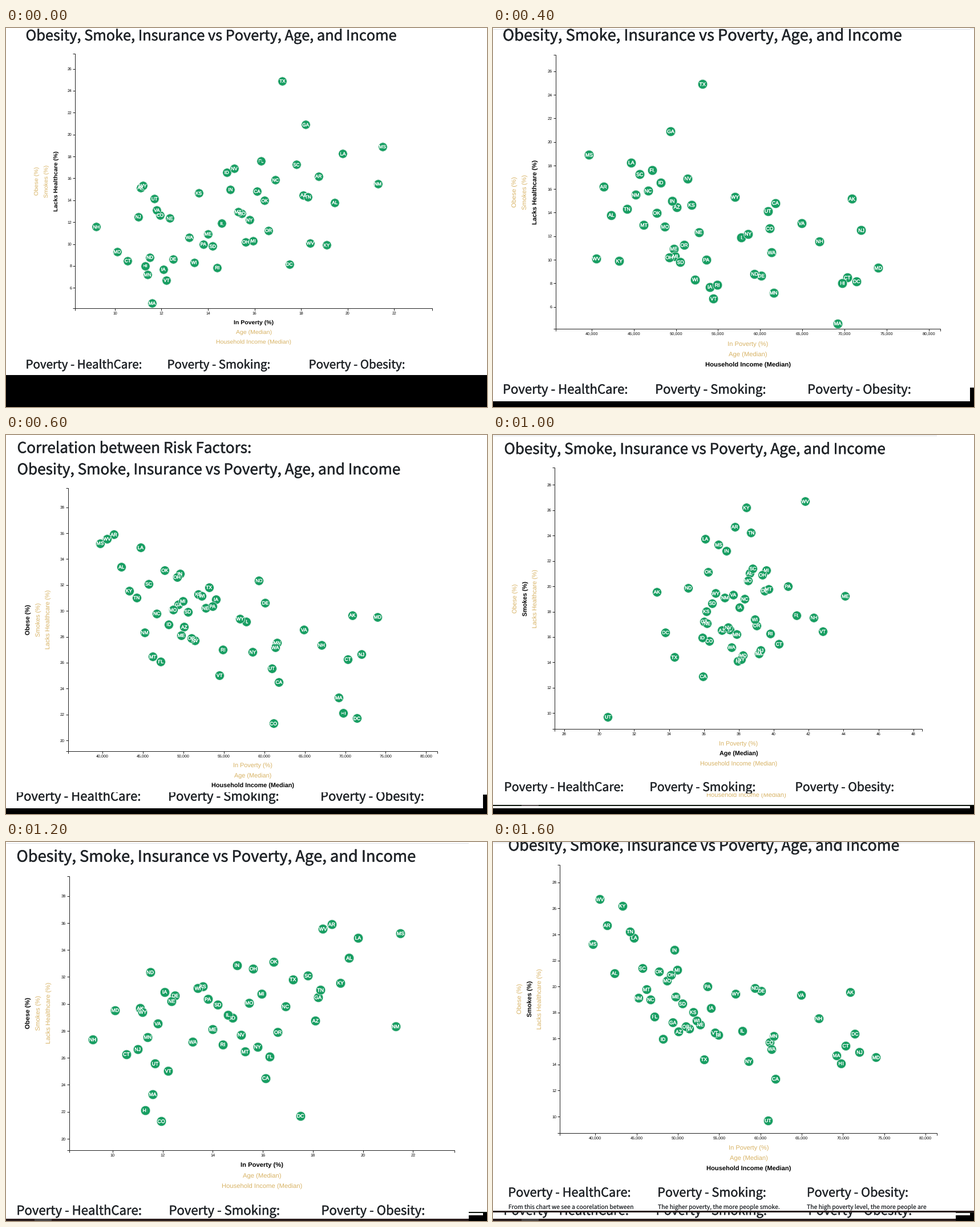
A matplotlib script that plays this animation: 843 px wide and 664 px high, repeating every 1800 ms.

```python
import numpy as np
import matplotlib.pyplot as plt
from matplotlib import patheffects
from matplotlib.animation import FuncAnimation
from matplotlib.patches import Rectangle

W, H, DPI = 843, 664, 100
PT = 72 / DPI  # points per pixel

GREEN, RIM, GOLD, INK = "#179e62", "#dfeee6", "#d8b365", "#212529"
SANS, HUMANIST = "Liberation Sans", "Noto Sans CJK JP"


def ranked(states, *points):
    """Give states, listed from low to high, values along a (rank, value) curve."""
    names = states.split()
    return dict(zip(names, np.interp(range(len(names)), *zip(*points))))


poverty = ranked(
    "NH MD CT NJ AK WY HI MN ND MA UT VA CO IA VT NE DE WA WI KS PA ME SD RI IL ID "
    "IN NV MT MO OH NY MI CA FL OK OR NC TX DC SC AZ GA TN WV AR KY AL LA NM MS",
    (0, 9.2), (1, 10.1), (3, 11), (11, 11.8), (16, 12.5), (17, 13.2), (25, 14.8),
    (36, 16.6), (41, 18.1), (44, 18.4), (48, 19.8), (49, 21.3), (50, 21.5))
age = ranked(
    "UT AK DC TX ND ID CA GA LA KS NE OK CO SD WY MS AZ NM IN NV IL WA VA AR MN HI "
    "IA NY MD NC KY MO AL TN SC WI OR MA NJ OH DE MI MT RI CT PA FL WV NH VT ME",
    (0, 30.5), (1, 33.3), (3, 34.3), (5, 35.9), (12, 36.3), (17, 37.2),
    (34, 38.8), (43, 39.8), (49, 42.8), (50, 44.1))
income = ranked(
    "MS WV AR AL KY TN LA NM SC MT NC FL OK ID MO OH GA IN ME MI AZ SD OR NV KS WI "
    "NE TX PA IA VT RI WY IL NY ND DE UT CO WA MN CA VA NH MA HI CT AK DC NJ MD",
    (0, 39700), (2, 41400), (5, 44200), (15, 49200), (20, 50100), (31, 54900),
    (32, 57000), (37, 60900), (41, 61800), (42, 64900), (44, 69200), (49, 72000),
    (50, 74000))
healthcare = ranked(
    "MA VT MN IA RI HI DC WI CT DE ND MD SD KY PA WV OH MI WA ME OR NH IL NY NE NJ "
    "CO MO MT VA AL OK UT TN AZ KS CA IN AK WY NM NC AR ID NV SC FL LA MS GA TX",
    (0, 4.6), (1, 6.7), (3, 7.7), (10, 8.8), (12, 9.8), (17, 10.3), (23, 12.2),
    (29, 13.1), (30, 13.8), (40, 15.5), (46, 17.6), (48, 18.9), (49, 20.9),
    (50, 24.9))
smokes = ranked(
    "UT CA HI NY TX MD MA NJ WA CT CO ID MN RI DC VT AZ IL NV OR NE GA WI NH FL KS "
    "IA SD NC NM ME VA WY AK DE MT ND PA MO OH AL OK MI SC IN MS LA TN AR KY WV",
    (0, 9.7), (1, 12.9), (2, 14.1), (6, 14.7), (12, 16.2), (17, 16.6), (24, 17.7),
    (28, 19), (37, 20), (39, 20.9), (43, 21.4), (44, 22.8), (48, 24.7),
    (49, 26.2), (50, 26.7))
obesity = ranked(
    "CO DC HI MA CA VT UT FL CT MT NJ NY RI WA NH MN NV OR ME NM VA AZ ID IL WY MD "
    "AK NC SD MO NE PA GA DE MI IA TN WI KS KY TX SC ND OH IN OK AL LA MS WV AR",
    (0, 21.3), (2, 22.1), (4, 24.5), (7, 26.1), (17, 27.9), (24, 29.4),
    (38, 31.3), (46, 33.4), (47, 34.9), (50, 35.9))
STATES = sorted(poverty)

# label, values, tick step
X_VARS = [("In Poverty (%)", poverty, 2), ("Age (Median)", age, 2),
          ("Household Income (Median)", income, 5000)]
Y_VARS = [("Lacks Healthcare (%)", healthcare, 2), ("Smokes (%)", smokes, 2),
          ("Obese (%)", obesity, 2)]
POVERTY, AGE, INCOME = range(3)
HEALTH, SMOKES, OBESE = range(3)

TITLES = ["Obesity, Smoke, Insurance vs Poverty, Age, and Income",
          "Correlation between Risk Factors:"]
COLUMNS = [
    ("Poverty - HealthCare:", "From this chart we see a coorelation between"),
    ("Poverty - Smoking:", "The higher poverty, the more people smoke."),
    ("Poverty - Obesity:", "The high poverty level, the more people are")]

# size, x and y variable, scale, left margin, chart top, rule y, taskbar (y, colour)
PAGES = [
    ((843, 608), POVERTY, HEALTH, 0.929, 36, 45, None, None),
    ((843, 630), AGE, HEALTH, 0.959, 36, 46, 0.5, None),
    ((836, 654), INCOME, HEALTH, 1.0, 18.5, 47, 1.5, None),
    ((843, 626), INCOME, OBESE, 0.96, 21, 93, None, None),
    ((843, 650), POVERTY, SMOKES, 0.986, 21, 95, None, (648, "#0c140c")),
    ((778, 628), AGE, SMOKES, 0.955, 21, 57, 0.5, None),
    ((811, 664), POVERTY, OBESE, 1.0, 20, 59.5, 1.5, (660, "#2a1c1c")),
    ((843, 635), AGE, OBESE, 0.965, 28, 45, 0.5, None),
    ((843, 649), INCOME, SMOKES, 0.98, 28, 39.6, 0.5, (646, "#2a1c1c")),
]

plt.rcParams["text.hinting"] = "none"
fig = plt.figure(figsize=(W / DPI, H / DPI), dpi=DPI, facecolor="black")


def write(ax, x, y, text, px, color="black", family=SANS, ha="center",
          va="baseline", stroke=0, **kw):
    t = ax.text(x, y, text, fontsize=px * PT, color=color, family=family,
                ha=ha, va=va, clip_on=True, **kw)
    if stroke:
        t.set_path_effects([patheffects.Stroke(linewidth=stroke * PT,
                                               foreground=color),
                            patheffects.Normal()])


def line(ax, xs, ys, color="#222222"):
    ax.plot(xs, ys, color=color, lw=PT, solid_capstyle="butt",
            solid_joinstyle="miter")


def domain(data):
    return min(data.values()) * 0.9, max(data.values()) * 1.1


def scale(data, start, end):
    lo, hi = domain(data)
    return lambda v: start + (v - lo) / (hi - lo) * (end - start)


def ticks(data, step):
    lo, hi = domain(data)
    return np.arange(np.ceil(lo / step) * step, hi, step)


def draw_axes(ax, x_var, y_var, to_x, to_y, box, s):
    left, right, top, bottom = box
    tick = 4.2 * s
    line(ax, [left, left, right, right],
         [bottom + tick, bottom, bottom, bottom + tick])
    line(ax, [left - tick, left, left, left - tick], [bottom, bottom, top, top])
    for v in ticks(*x_var[1:]):
        x = to_x(v)
        line(ax, [x, x], [bottom, bottom + tick])
        write(ax, x, bottom + 11.4 * s, f"{v:,.0f}", 7.4 * s)
    for v in ticks(*y_var[1:]):
        y = to_y(v)
        line(ax, [left - tick, left], [y, y])
        write(ax, left - 6 * s, y + 2.6 * s, f"{v:.0f}", 7.4 * s, ha="right")


def draw_labels(ax, xi, yi, box, s):
    left, right, top, bottom = box

    def style(active):
        return dict(color="black" if active else GOLD,
                    weight="bold" if active else "normal")

    for i, (label, *_) in enumerate(X_VARS):
        write(ax, (left + right) / 2, bottom + (30.6 + 18.2 * i) * s, label,
              11.3 * s, **style(i == xi))
    for i, (label, *_) in enumerate(Y_VARS):
        write(ax, left - (35 + 18.1 * i) * s, (top + bottom) / 2, label,
              11.3 * s, va="center", rotation=90, **style(i == yi))


def draw_chart(ax, xi, yi, s, left, top):
    box = left, right, _, bottom = left, left + 674.5 * s, top, top + 480 * s
    x_var, y_var = X_VARS[xi], Y_VARS[yi]
    to_x, to_y = scale(x_var[1], left, right), scale(y_var[1], bottom, top)
    draw_axes(ax, x_var, y_var, to_x, to_y, box, s)
    draw_labels(ax, xi, yi, box, s)

    px = [to_x(x_var[1][name]) for name in STATES]
    py = [to_y(y_var[1][name]) for name in STATES]
    ax.scatter(px, py, s=(16.6 * s * PT) ** 2, c=GREEN, edgecolors=RIM,
               linewidths=0.8 * PT, zorder=3)
    for x, y, name in zip(px, py, STATES):
        write(ax, x, y + 3.1 * s, name, 8.7 * s, "white", stroke=0.25, zorder=4)
    return bottom


def draw_page(size, xi, yi, s, x0, top, rule, taskbar):
    w, h = size
    ax = fig.add_axes([0, 1 - h / H, w / W, h / H], facecolor="white")
    ax.set(xlim=(0, w), ylim=(h, 0), xticks=[], yticks=[], autoscale_on=False)
    ax.spines[:].set_visible(False)

    for i, title in enumerate(TITLES):
        write(ax, x0 - 1.5, top - (25 + 39.2 * i) * s, title, 27.25 * s, INK,
              HUMANIST, "left", stroke=0.5)
    bottom = draw_chart(ax, xi, yi, s, x0 + 91.3 * s, top)
    for i, (heading, body) in enumerate(COLUMNS):
        x = x0 - 1.5 + 267 * s * i
        write(ax, x, bottom + 113.6 * s, heading, 22.1 * s, INK, HUMANIST,
              "left", stroke=0.4)
        write(ax, x + 0.5, bottom + 136 * s, body, 10.6 * s, INK, HUMANIST, "left")

    if rule is not None:
        line(ax, [0, w], [rule, rule], "#dcdfe6")
    if taskbar:
        y, color = taskbar
        ax.add_patch(Rectangle((0, y), w, h - y, color=color, lw=0, zorder=6))
        ax.add_patch(Rectangle((50, y), 30, h - y, color="#4a4545", lw=0, zorder=7))
    return ax


pages = [draw_page(*page) for page in PAGES]


def update(n):
    # smaller pages leave the edges of earlier ones in view
    for i, page in enumerate(pages):
        page.set_visible(i <= n)
    return pages


anim = FuncAnimation(fig, update, frames=len(PAGES), interval=200,
                     init_func=lambda: update(0), repeat=True, repeat_delay=0,
                     blit=False)
plt.show()
```
